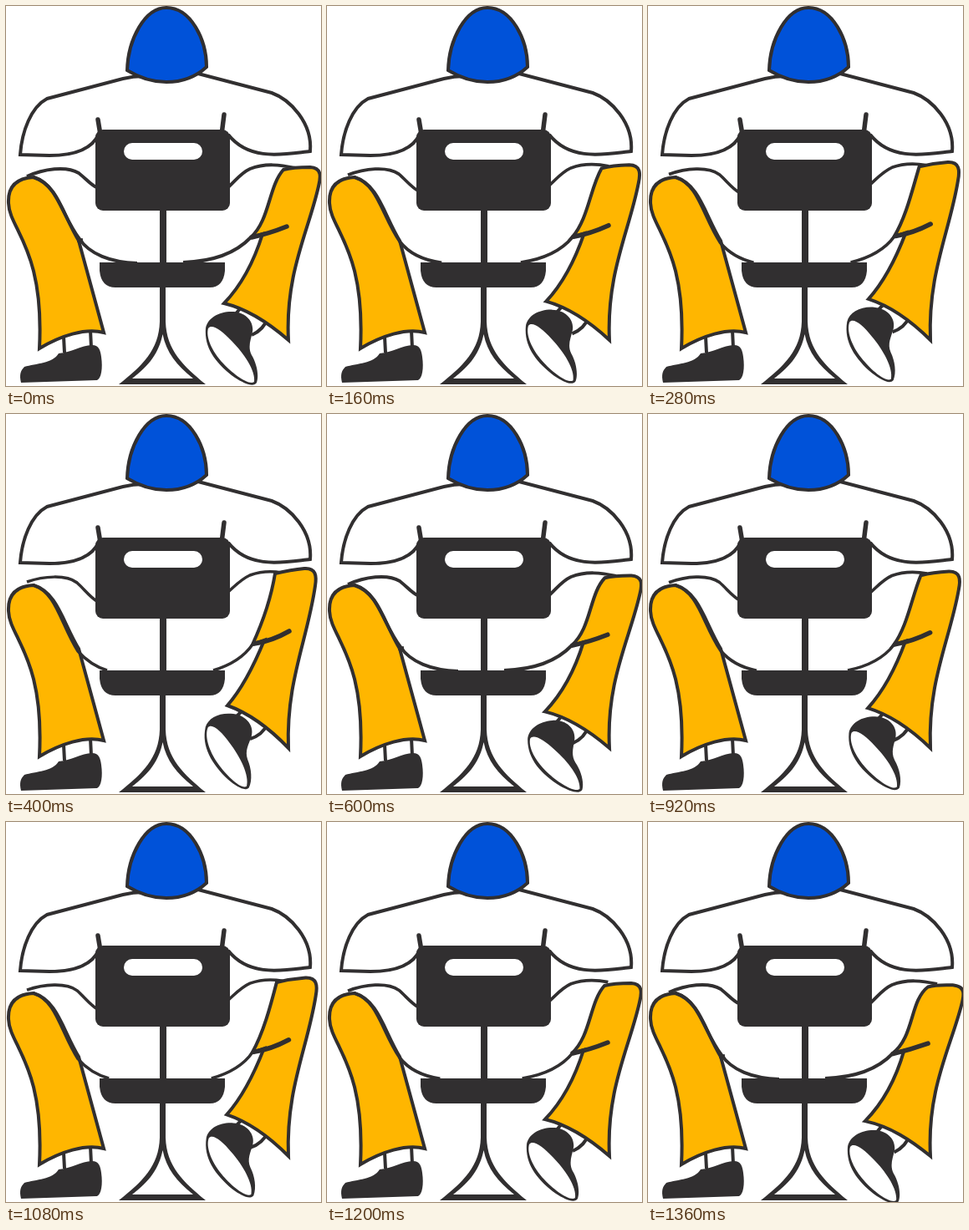
Recreate the animation shown at these times as an HTML page. Size 377 by 455 pixels, loop 2 s.

```html
<!DOCTYPE html>
<html lang="en">
<head>
<meta charset="utf-8">
<title>Restless leg</title>
<style>
  html, body { margin: 0; width: 100%; height: 100%; overflow: hidden; background: #fff; }
  svg { display: block; width: 100vw; height: 100vh; }
  .line { fill: none; stroke: #312f30; stroke-width: 4; }
  .thick { stroke-width: 5.5; stroke-linecap: round; }
  .dark { fill: #312f30; }
  .white { fill: #fff; }
  .pants { fill: #ffb600; }
  .hood { fill: #0052d9; }
</style>
</head>
<body>
<svg viewBox="0 0 377 455">
  <!-- torso and hood -->
  <path class="line" d="M165 84C153 84 148 85 140 87L49 111C30 121 19 150 17 178L52 179C80 179 103 172 111 153"/>
  <path class="line" d="M230 81L318 104C340 112 367 140 364 174C335 177 292 187 266 154"/>
  <path class="line thick" d="M110 136L113 154M261 130L258 154"/>
  <path class="line hood" d="M145 77C146 40 166 2 192 2C221 2 240 40 240 73C226 86 209 91 192 91C174 91 158 85 145 77Z"/>

  <!-- left leg -->
  <path class="line" d="M69 396L70 415M101 388L102 409"/>
  <path class="line pants" d="M33 205C15 206 2 214 3 236C4 268 46 290 40 410C65 395 95 385 117 391L87 281C68 250 62 214 33 205Z"/>
  <path class="dark" d="M18 451C16 442 17 437 22 432C36 428 56 428 63 416C78 415 90 406 103 406C111 406 113 412 114 420C116 434 114 446 109 448Z"/>
  <path class="line" id="thighL"/>
  <path class="line" id="underL"/>
  <path class="line" id="hook" d="M85 281L92 280"/>

  <!-- right leg -->
  <path class="line" id="thighR"/>
  <path class="line" id="ankle"/>
  <path class="line pants" id="pantsR"/>
  <path class="line" id="underR"/>
  <path class="line thick" id="crease"/>
  <g id="shoe">
    <path class="dark" d="M239 386C241 374 254 366 270 366C287 366 297 378 295 390C293 400 289 408 294 418C300 428 303 442 300 451C296 457 285 452 274 445C252 429 237 410 239 386Z"/>
    <path class="white" d="M242 386C246 380 258 388 270 401C285 416 299 437 297 450C291 455 271 440 260 428C246 413 239 396 242 386Z"/>
  </g>

  <!-- chair -->
  <rect class="dark" x="184" y="240" width="8" height="70"/>
  <rect class="dark" x="107" y="148" width="161" height="97" rx="9"/>
  <rect class="white" x="141" y="164" width="94" height="20" rx="10"/>
  <path class="dark" d="M112 307H262V317Q260 337 244 337H131Q114 337 112 317Z"/>
  <path class="dark" d="M184 335V378C183 412 163 431 135 453H239C212 431 192 412 191 378V335Z"/>
  <path class="white" d="M187.5 393C183 415 172 430 151 446H224C204 430 192 415 187.5 393Z"/>
</svg>
<script>
const LOOP = 2000, STEP = 40, LAST = 1360;

// time, leg lift, body lift, shoe angle, shoe x, shoe y
const keys = [
  [0, 0, 0, 0, 0, 0],
  [160, .33, .55, 1.2, -1, -3],
  [400, 1, 1, 7.4, 0, -11],
  [600, -.05, 0, -4, 1, 3],
  [920, .55, .75, .5, 1.5, -4],
  [1060, .85, .95, 4, 1, -8],
  [1200, 0, .6, 0, 0, 0],
  [1360, -.3, 0, 0, 0, 3]
];

// resting and raised outlines
const poses = {
  thighL: ['M25 204C45 195 72 191 87 200C96 207 102 215 110 218',
           'M25 201C45 194 72 192 85 202C94 210 100 219 110 225'],
  underL: ['M33 205C62 214 66 250 88 279C100 297 125 307 157 308',
           'M33 205C60 213 66 253 86 284C95 294 105 302 121 307'],
  thighR: ['M266 217C275 209 281 200 292 195C310 188 328 190 346 194',
           'M266 213C275 205 281 198 292 193C306 188 318 188 330 190'],
  underR: ['M293 277C273 298 245 306 212 307',
           'M295 276C284 292 268 301 248 307'],
  pantsR: ['M332 196C343 193 355 193 364 193C378 194 377 204 374 216C362 270 334 320 338 400C315 380 290 363 261 356C285 331 298 302 307 273L293 277C316 256 314 216 332 196Z',
           'M322 191C335 188 347 186 357 185C371 184 372 194 370 206C361 270 335 320 338 400C315 376 290 358 265 349C285 326 298 298 309 271L295 276C306 252 317 222 322 191Z'],
  crease: ['M294 277C308 274 321 270 336 264',
           'M297 275C311 273 325 268 339 260'],
  ankle: ['M283 359L272 372M313 374C310 383 303 390 294 394',
          'M284 354L275 363M313 371C309 380 302 386 292 389']
};
const bodyParts = ['thighL', 'underL', 'thighR', 'underR'];
const el = id => document.getElementById(id);

function mix([rest, raised], k) {
  const ends = raised.match(/[\d.]+/g);
  let i = 0;
  return rest.replace(/[\d.]+/g, n => (+n + (ends[i++] - n) * k).toFixed(2));
}

function slope(i, c) {
  if (i === 0 || i === keys.length - 1) return 0;
  const [a, b, d] = [keys[i - 1], keys[i], keys[i + 1]];
  const s1 = (b[c] - a[c]) / (b[0] - a[0]), s2 = (d[c] - b[c]) / (d[0] - b[0]);
  return s1 * s2 > 0 ? 2 * s1 * s2 / (s1 + s2) : 0;
}

function sample(t, c) {
  let i = 0;
  while (i < keys.length - 2 && t > keys[i + 1][0]) i++;
  const a = keys[i], b = keys[i + 1], h = b[0] - a[0], u = (t - a[0]) / h;
  const s = u * u * (3 - 2 * u);
  return a[c] + (b[c] - a[c]) * s
    + h * u * (1 - u) * ((1 - u) * slope(i, c) - u * slope(i + 1, c));
}

function draw(t) {
  const [leg, body, angle, x, y] = [1, 2, 3, 4, 5].map(c => sample(t, c));
  for (const id in poses)
    el(id).setAttribute('d', mix(poses[id], bodyParts.includes(id) ? body : leg));
  for (const id of bodyParts) el(id).style.strokeWidth = 4 - .5 * body;
  el('hook').style.opacity = body < .2 ? 1 : 0;
  el('shoe').setAttribute('transform', `translate(${x} ${y}) rotate(${angle} 240 384)`);
}

const start = performance.now();
function tick() {
  const t = (performance.now() - start) % LOOP;
  draw(Math.min(LAST, Math.floor(t / STEP) * STEP));
  requestAnimationFrame(tick);
}
tick();
</script>
</body>
</html>
```
